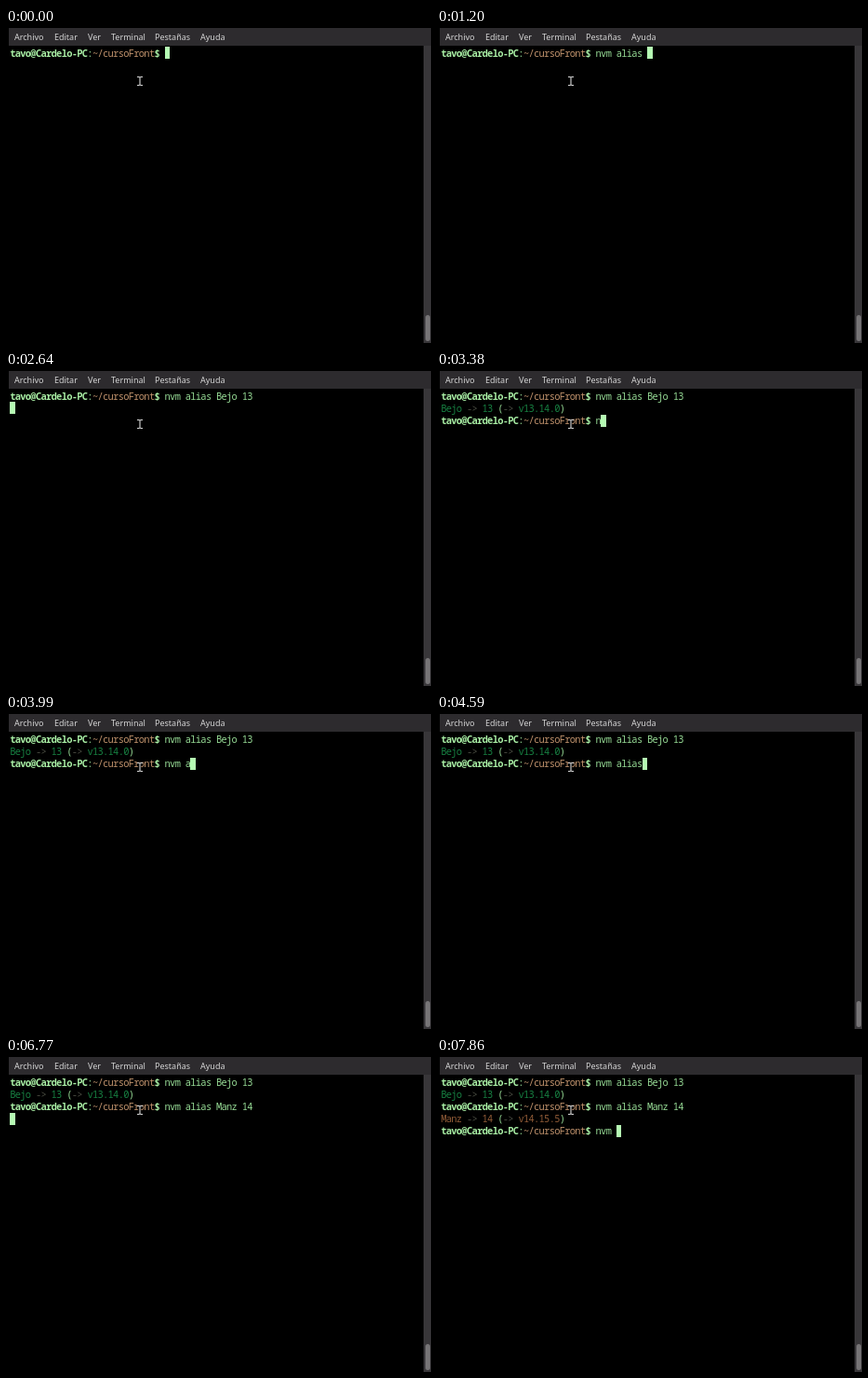
An HTML page that plays this animation: 457 by 338 pixels, repeating every 8000 ms.

```html
<!DOCTYPE html>
<html lang="es">
<head>
<meta charset="utf-8">
<title>Terminal</title>
<style>
  html, body { margin: 0; width: 100%; height: 100%; overflow: hidden; background: #000; }
  body { position: relative; }
  .menu, .menu span, .track, .thumb, .mouse, #screen, #cursor { position: absolute; }
  .menu {
    left: 3px; right: 0; top: 0; height: 19px;
    background: #2d2b2e; color: #d4d4d4;
    font: 9px/20px "Noto Sans", sans-serif;
  }
  .track { left: 449px; width: 8px; top: 19px; bottom: 0; background: #383639; }
  .thumb { left: 451px; width: 4.5px; top: 308px; height: 28px; border-radius: 2.5px; background: #767476; }
  #screen {
    --col: 5.55px; --row: 13.2px;
    left: 4.2px; top: 20.5px;
    font: 10.4px/var(--row) "Noto Sans Mono", monospace;
    letter-spacing: -.69px; white-space: pre; color: #97dc96;
  }
  #screen div { height: var(--row); }
  #screen b { font-weight: 600; color: #a9efa5; }
  #screen i { font-style: normal; font-weight: 500; color: #c0926c; }
  #cursor {
    left: calc(var(--x) * var(--col)); top: calc(var(--y) * var(--row) - .3px);
    width: 5.6px; height: 13px; background: #b5fbb3;
  }
  .green { color: #178142; }
  .brown { color: #925c37; }
  .dim { color: #4a4c42; }
  .mouse { left: 139px; top: 50.5px; }
  .mouse path { d: path("M2 1.5H4L5 2.3L6 1.5H8M5 2.3V9.7M2 10.5H4L5 9.7L6 10.5H8"); }
</style>
</head>
<body>
<div class="menu">
  <span style="left:6px">Archivo</span>
  <span style="left:49px">Editar</span>
  <span style="left:85px">Ver</span>
  <span style="left:110px">Terminal</span>
  <span style="left:157px">Pestañas</span>
  <span style="left:206px">Ayuda</span>
</div>
<div id="screen"></div>
<div class="track"></div>
<div class="thumb"></div>
<svg class="mouse" width="10" height="12" fill="none">
  <path stroke="#111" stroke-width="2.4"/>
  <path stroke="#ccc" stroke-width="1.1"/>
</svg>
<script>
const LOOP = 8000, STEP = 120, PROMPT_COLS = 30;
const prompt = '<b>tavo@Cardelo-PC</b>:<i>~/cursoFront</i><b>$</b> ';

// Each burst types its text one key per step from its start time.
const commands = [
  { shown: 0, enter: 2520, output: 2760, result: ['green', 'Bejo', '13', 'v13.14.0'],
    bursts: [[240, 'nvm '], [840, 'al'], [1080, 'ia', 0], [1200, 's ', 0],
             [1440, 'B'], [1680, 'e'], [1920, 'jo 13']] },
  { shown: 2880, enter: 6650, output: 6890, result: ['brown', 'Manz', '14', 'v14.15.5'],
    bursts: [[3380, 'nvm '], [3990, 'alias'], [4960, ' '], [5200, 'Manz '], [6040, '14']] },
  { shown: 7010, enter: Infinity, output: Infinity, bursts: [[7500, 'nvm ']] }
];

const screen = document.getElementById('screen');

function typed(bursts, t) {
  return bursts.map(([start, text, step = STEP]) =>
    [...text].filter((_, i) => t >= start + i * step).join('')).join('');
}

function resultLine([color, name, version, full]) {
  const tint = s => `<span class="${color}">${s}</span>`;
  const arrow = '<span class="dim">-&gt;</span>';
  return `${tint(name)} ${arrow} ${tint(version)} (${arrow} ${tint(full)})`;
}

function view(t) {
  const lines = [];
  let x = 0, y = 0;
  for (const c of commands) {
    if (t < c.shown) break;
    const text = typed(c.bursts, t);
    lines.push(prompt + text);
    [x, y] = t < c.enter ? [PROMPT_COLS + text.length, lines.length - 1] : [0, lines.length];
    if (t >= c.output) {
      lines.push(resultLine(c.result));
      y = lines.length;
    }
  }
  return lines.map(l => `<div>${l}</div>`).join('') +
    `<span id="cursor" style="--x:${x};--y:${y}"></span>`;
}

let last = '';
const origin = performance.now();
function frame() {
  const html = view((performance.now() - origin) % LOOP);
  if (html !== last) screen.innerHTML = last = html;
  requestAnimationFrame(frame);
}
frame();
</script>
</body>
</html>
```
